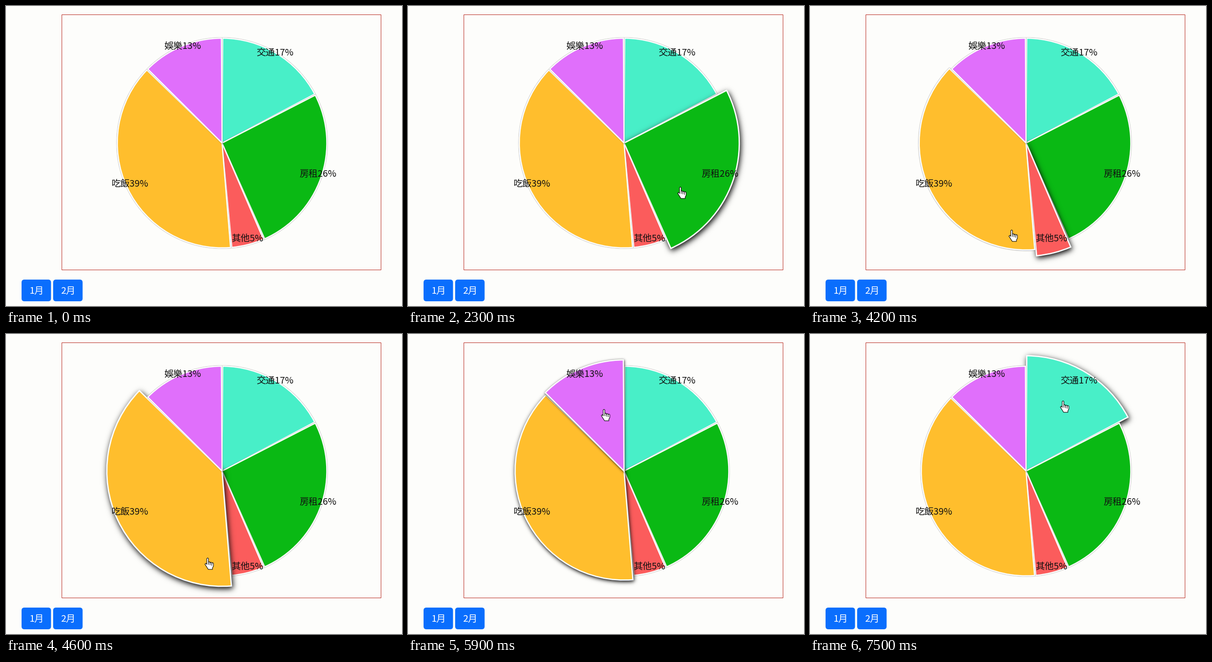
Recreate the animation shown at these times as a matplotlib script. Size 840 by 636 pixels, loop 8000 ms.

```python
import numpy as np
import matplotlib.pyplot as plt
from matplotlib.animation import FuncAnimation
from matplotlib.patches import FancyBboxPatch, PathPatch, Rectangle, Wedge
from matplotlib.path import Path
from matplotlib.transforms import Affine2D

W, H, DPI = 840, 636, 100
STEP, FRAMES = 100, 80
PT = 72 / DPI  # points per pixel

plt.rcParams["font.family"] = ["Noto Sans CJK JP"]
plt.rcParams["font.weight"] = "light"
fig = plt.figure(figsize=(W / DPI, H / DPI), dpi=DPI, facecolor="#fdfdfb")
PX = Affine2D().scale(1 / W, -1 / H).translate(0, 1) + fig.transFigure

# Pie geometry; angles run clockwise from the top
CX, CY, R = 458.3, 290.5, 222.2
LABEL_R = 216
PAD = 0.7
STROKE = 2.5
FADE = 500

# Name, share in percent, colour, time the pointer enters
EXPENSES = [("交通", 17.36, "#48efc8", 7000),
            ("房租", 26.08, "#0ab914", 1780),
            ("其他", 5.17, "#fb5c5c", 2950),
            ("吃飯", 38.75, "#ffbe2d", 4100),
            ("娛樂", 12.64, "#e06ffb", 5600)]
ENTRIES = sorted(e[3] for e in EXPENSES) + [np.inf]

# Pointer stops: arrival, departure, x, y
STOPS = [(1300, 1300, 780, 372), (2100, 2600, 578, 384), (3200, 3900, 486, 456),
         (4200, 5000, 428, 475), (5400, 5400, 369, 254), (5900, 6800, 416, 160),
         (7300, 8000, 537, 142)]

# Pixel grid for the blurred shadows
SIZE = 548
LEFT, TOP = 184, 16
gx = np.arange(SIZE) + LEFT + 0.5 - CX
gy = (np.arange(SIZE) + TOP + 0.5 - CY)[:, None]
RHO = np.hypot(gx, gy)
FX = np.fft.rfftfreq(SIZE)
FY = np.fft.fftfreq(SIZE)[:, None]


def add(patch, z):
    patch.set_transform(PX)
    patch.set_zorder(z)
    return fig.add_artist(patch)


def label(text, x, y, size, color):
    fig.text(x, y, text, transform=PX, size=size * PT, color=color,
             ha="center", va="baseline", zorder=30)


def shadow(a0, a1, scale, s):
    """Black drop shadow, from a faint 1px glow (s=0) to 2px 4px 6px (s=1)."""
    t0, t1 = np.radians([a0, a1])
    inside = np.minimum(gx * np.cos(t0) + gy * np.sin(t0),
                        -gx * np.cos(t1) - gy * np.sin(t1))
    inside = np.minimum(inside, R * scale - RHO)
    mask = np.clip(inside + STROKE / 2 * scale + 0.5, 0, 1)
    sigma = 0.8 + 5.2 * s
    kernel = np.exp(-2 * np.pi**2 * sigma**2 * (FX**2 + FY**2)
                    - 2j * np.pi * s * (2 * FX + 4 * FY))
    blur = np.fft.irfft2(np.fft.rfft2(mask) * kernel, s=(SIZE, SIZE))
    alpha = min(1, 0.5 + s)
    rgba = np.zeros((SIZE, SIZE, 4), np.uint8)
    rgba[..., 3] = np.clip(blur * alpha * 255, 0, 255).round()
    return rgba


class Slice:
    def __init__(self, start, share, color, enter, z):
        self.a0 = 3.6 * start + PAD / 2
        self.a1 = 3.6 * (start + share) - PAD / 2
        self.enter, self.leave = enter, ENTRIES[ENTRIES.index(enter) + 1]
        self.state = (0, 0)
        self.glow = fig.figimage(shadow(self.a0, self.a1, 1, 0), LEFT,
                                 H - TOP - SIZE, origin="upper", zorder=z)
        self.wedge = add(Wedge((CX, CY), R, self.a0 - 90, self.a1 - 90, fc=color,
                               ec="white", lw=STROKE * PT, joinstyle="miter"), z + 1)

    def update(self, t):
        grow, shrink = (np.clip((t - t0) / FADE, 0, 1) for t0 in (self.enter, self.leave))
        # The shadow lags behind the size in both directions
        state = (grow - shrink, grow**2 - shrink**2)
        if state == self.state:
            return
        self.state = state
        scale = 1 + 0.1 * state[0]
        self.wedge.set_radius(R * scale)
        self.wedge.set_linewidth(STROKE * scale * PT)
        self.glow.set_data(shadow(self.a0, self.a1, scale, state[1]))


def pointer(points, creases=()):
    verts = points + points[:1]
    codes = [Path.MOVETO] + [Path.LINETO] * (len(points) - 1) + [Path.CLOSEPOLY]
    for x, y in creases:
        verts = verts + [(x, y), (x, y + 5)]
        codes += [Path.MOVETO, Path.LINETO]
    return add(PathPatch(Path(verts, codes), fc="white", ec="black", lw=1.1 * PT,
                         joinstyle="round"), 40)


def hand_pointer():
    points, creases = [], []
    for j in range(4):
        x, y = -2 + 3.5 * j, 7 + j if j else 0
        points += [(x, y + 1.2), (x + 1, y), (x + 2.5, y), (x + 3.5, y + 1.2)]
        creases += [(x, y + 1)] if j else []
    palm = [(12, 17), (10, 21), (10, 24), (1, 24), (-6, 13), (-4, 11), (-2, 13.5)]
    return pointer(points + palm, creases)


add(Rectangle((118.5, 18.5), 677, 541, fc="none", ec="#b8281e", lw=PT, snap=False), 1)

slices, start = [], 0
for i, (name, share, color, enter) in enumerate(EXPENSES):
    slices.append(Slice(start, share, color, enter, 2 * i + 2))
    mid = np.radians(3.6 * (start + share / 2))
    label(f"{name}{share:.0f}%", CX + LABEL_R * np.sin(mid),
          CY - LABEL_R * np.cos(mid), 19.5, "#111111")
    start += share

for month in (1, 2):
    x = 33 + 67 * (month - 1)
    add(FancyBboxPatch((x, 580), 62.5, 46, boxstyle="round,pad=0,rounding_size=6",
                       fc="#0a6efd", ec="none"), 1)
    label(f"{month}月", x + 31.5, 610, 20, "white")

hand = hand_pointer()
arrow = pointer([(0, 0), (0, 16), (3.7, 12.6), (6.3, 18.6), (8.6, 17.6),
                 (6, 11.8), (11.2, 11.6)])
track_t = [t for stop in STOPS for t in stop[:2]]
track_xy = np.repeat([stop[2:] for stop in STOPS], 2, axis=0)


def draw(i):
    t = i * STEP
    for s in slices:
        s.update(t)
    x, y = (np.interp(t, track_t, axis) for axis in track_xy.T)
    over = t >= ENTRIES[0]
    hand.set_visible(over)
    arrow.set_visible(t >= track_t[0] and not over)
    for p in (hand, arrow):
        p.set_transform(Affine2D().translate(x, y) + PX)
    return []


anim = FuncAnimation(fig, draw, frames=FRAMES, interval=STEP, repeat=True,
                     repeat_delay=0, blit=False)
plt.show()
```
